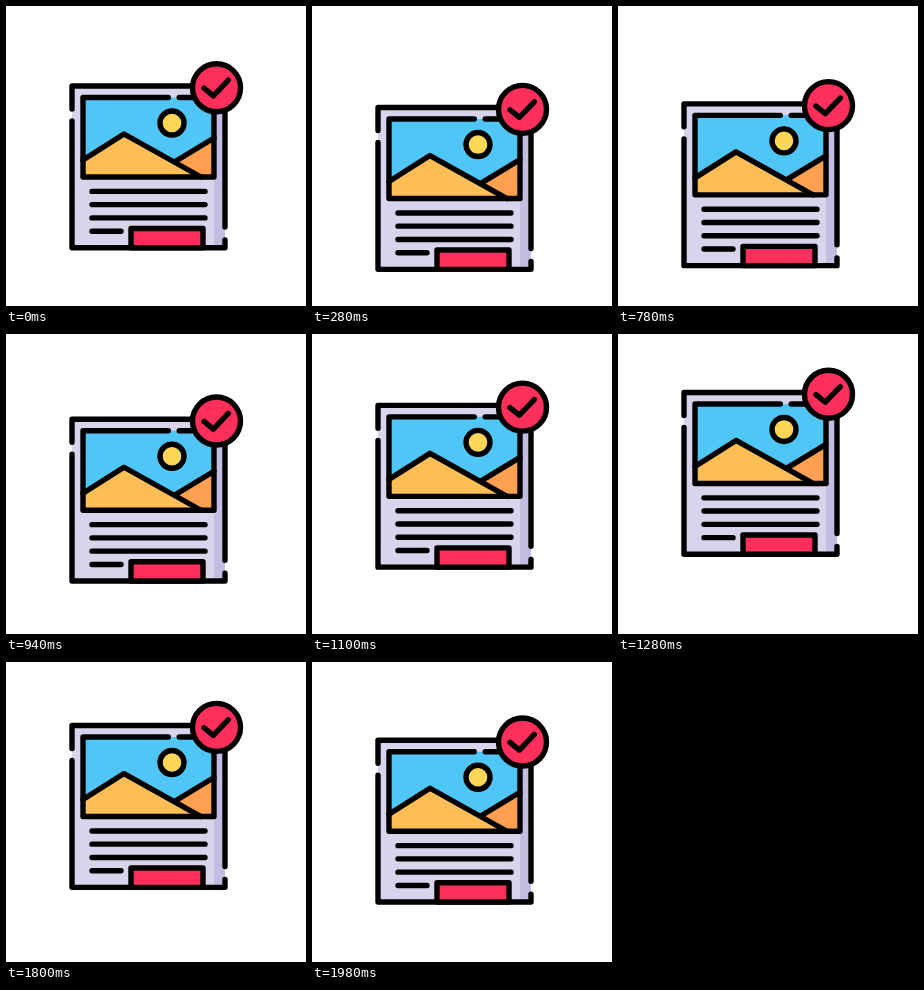
An HTML page for the animation above (2000 ms loop, 300 by 300 pixels).

```html
<!DOCTYPE html>
<html lang="en">
<head>
<meta charset="utf-8">
<title>Approved page</title>
<style>
  html, body { margin: 0; width: 100%; height: 100%; overflow: hidden; background: #fff; }
  svg { display: block; width: 100vw; height: 100vh; }
  .line { fill: none; stroke: #000; stroke-width: 5.4; stroke-linecap: round; stroke-linejoin: round; }
</style>
</head>
<body>
<svg viewBox="0 0 300 300">
  <g id="card">
    <!-- page -->
    <path fill="#d9d4ec" d="M66 80H219V242H66Z"/>
    <path fill="#c5bce2" d="M208 80H219V242H208Z"/>
    <path class="line" d="M66 103V80H200M66 115V241.8H219V234M219 100V221"/>

    <!-- picture -->
    <path fill="#50c6f7" d="M77 91.5H208V171H77Z"/>
    <path fill="#ff9f50" d="M168 156L208 132V171H190Z"/>
    <path fill="#ffbe55" d="M77 154L118 128L195 171H77Z"/>
    <circle cx="166" cy="117" r="12" fill="#ffd655"/>
    <circle class="line" cx="166" cy="117" r="12"/>
    <path class="line" d="M77 154L118 128L195 171M170 155L208 132"/>
    <path class="line" d="M162.3 91.5H77V171H208V91.5H173.2"/>

    <!-- text lines and button -->
    <path class="line" d="M86 185.4H199M86 198.6H199M86 211.9H199M86 225.2H115"/>
    <path fill="#ff2f5c" d="M125 222.5H197V241.8H125Z"/>
    <path class="line" d="M125 241.8V222.5H197V241.8Z"/>

    <!-- badge -->
    <circle cx="210.5" cy="81.8" r="24" fill="#ff2f5c"/>
    <circle class="line" cx="210.5" cy="81.8" r="24"/>
    <path class="line" d="M198 82.2L207.3 89.8L222.3 74.2"/>
  </g>
</svg>
<script>
  const LOOP = 2000, STEP = 20, HEIGHT = 28;
  const card = document.getElementById('card');
  const start = performance.now();

  function draw(now) {
    const elapsed = Math.max(0, now - start) % LOOP;
    const t = Math.floor(elapsed / STEP) * STEP;
    const y = HEIGHT * Math.sin(2 * Math.PI * t / LOOP);
    card.setAttribute('transform', `translate(0 ${y.toFixed(3)})`);
    requestAnimationFrame(draw);
  }
  draw(start);
</script>
</body>
</html>
```
